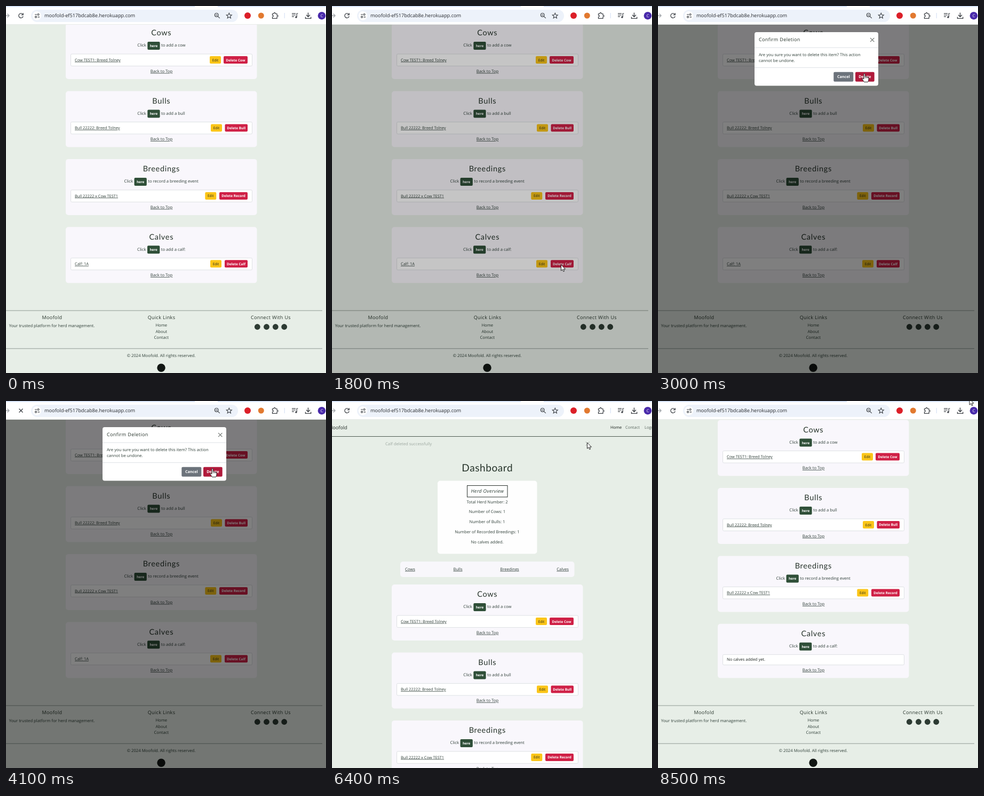
Animation, 600 px wide and 688 px high, one loop 8600 ms. Source, as an HTML page:

```html
<!DOCTYPE html>
<html lang="en">
<head>
<meta charset="utf-8">
<title>Herd dashboard</title>
<style>
html, body { margin: 0; width: 100%; height: 100%; overflow: hidden; background: #e7eee7; }
svg { display: block; width: 600px; height: 688px; }
text { font-family: "Open Sans", "Noto Sans", sans-serif; text-rendering: geometricPrecision; white-space: pre; }
.head { font-family: Lato, "Open Sans", sans-serif; }
.link { text-decoration: underline; }
</style>
</head>
<body>
<svg id="stage" viewBox="0 0 600 688" xmlns="http://www.w3.org/2000/svg"></svg>
<script>
const LOOP = 8600, STEP = 100;
const INK = '#2f3f38', DARK = '#26332a', GREEN = '#2f4f38', YELLOW = '#fbc518', RED = '#cf2046';
const stage = document.getElementById('stage');

function add(parent, tag, attrs) {
  const el = document.createElementNS(stage.namespaceURI, tag);
  for (const key in attrs) el.setAttribute(key, attrs[key]);
  parent.appendChild(el);
  return el;
}
const group = parent => add(parent, 'g', {});
const rect = (p, x, y, width, height, fill, rx = 0, more = {}) =>
  add(p, 'rect', { x, y, width, height, fill, rx, ...more });
const dot = (p, cx, cy, r, fill) => add(p, 'circle', { cx, cy, r, fill });
const stroke = (p, d, color, width = 1.3, more = {}) =>
  add(p, 'path', { d, fill: 'none', stroke: color, 'stroke-width': width, ...more });

// Text placed by the vertical middle of its capitals.
function text(p, x, cy, str, { size = 7.7, anchor = 'start', fill = INK, ...more } = {}) {
  const el = add(p, 'text', { x, y: cy + size * 0.36, 'font-size': size, 'text-anchor': anchor, fill, ...more });
  el.textContent = str;
  return el;
}
const mid = (p, x, cy, str, more = {}) => text(p, x, cy, str, { anchor: 'middle', ...more });
const title = (p, cy, str, size, spacing) =>
  mid(p, 291.3, cy, str, { size, class: 'head', fill: DARK, 'letter-spacing': spacing });
const label = (p, x, cy, str, more = {}) =>
  text(p, x, cy, str, { size: 9, fill: DARK, 'letter-spacing': 0.37, ...more });
const cross = (p, x, y, r, color, width = 1) =>
  stroke(p, `M${x - r} ${y - r}L${x + r} ${y + r}M${x + r} ${y - r}L${x - r} ${y + r}`, color, width);

function button(p, x, y, w, h, fill, str, color = '#fff', size = 6.4) {
  const g = group(p);
  const box = rect(g, x, y, w, h, fill, 2);
  mid(g, x + w / 2, y + h / 2 + 0.2, str, { size, fill: color, 'font-weight': color === '#fff' ? 700 : 400 });
  return box;
}

// Page
rect(stage, 0, 0, 600, 688, '#e7eee7');
const page = group(stage);

text(page, 28.5, 49.5, 'Moofold', { size: 9, anchor: 'end', fill: '#1c2620' });
text(page, 522, 49.5, 'Home', { size: 7.5, fill: '#18201b' });
text(page, 550, 49.5, 'Contact', { size: 7.5, fill: '#5d6a62' });
text(page, 586, 49.5, 'Logout', { size: 7.5, fill: '#5d6a62' });
rect(page, 0, 66, 600, 1, '#4d5a52');

const notice = group(page);
text(notice, 100, 80, 'Calf deleted successfully');
cross(notice, 479.3, 80, 3.6, '#6b736e', 1.2);

const main = group(page);
title(main, 125.5, 'Dashboard', 19, 0.6);
rect(main, 198, 149.5, 186.5, 137, '#fefefe', 5);
rect(main, 253.5, 158.5, 75.5, 21.5, 'none', 0, { stroke: '#2b332e' });
mid(main, 291.3, 169, 'Herd Overview', { size: 9, 'font-style': 'italic', 'letter-spacing': 0.35 });
['Total Herd Number: 2', 'Number of Cows: 1', 'Number of Bulls: 1',
 'Number of Recorded Breedings: 1', 'No calves added.']
  .forEach((str, i) => mid(main, 291, 189 + i * 18.7, str));

rect(main, 128, 301, 326.5, 29, '#f8f7fb', 5);
[['Cows', 137], ['Bulls', 227.5], ['Breedings', 315.3], ['Calves', 421.3]]
  .forEach(([str, x]) => text(main, x, 315, str, { class: 'link', size: 7.6 }));

const cardTop = i => 344 + i * 127.45;

function cardHead(g, y, name, action, x) {
  title(g, y + 18, name, 14.5, 0.7);
  text(g, x - 2.5, y + 41.6, 'Click', { anchor: 'end' });
  button(g, x, y + 35, 23.3, 15, GREEN, 'here');
  text(g, x + 25.7, y + 41.6, action);
}
const backLink = (g, y) => mid(g, 291.5, y, 'Back to Top', { class: 'link' });

function card(i, name, action, hereX, item, editX, kind, delX) {
  const y = cardTop(i), g = group(main);
  rect(g, 112, y, 358.5, 105, '#f9f7fc', 5);
  cardHead(g, y, name, action, hereX);
  rect(g, 121.5, y + 58, 340, 22.5, '#fff', 2, { stroke: '#dee1e4' });
  text(g, 129, y + 69, item, { class: 'link', size: 7.4 });
  button(g, editX, y + 62, 21, 14, YELLOW, 'Edit', '#23281f', 6.6);
  button(g, delX, y + 62, 453 - delX, 14, RED, 'Delete ' + kind);
  backLink(g, y + 90);
  return g;
}
card(0, 'Cows', 'to add a cow', 265.3, 'Cow TEST1: Breed Tolney', 382, 'Cow', 408);
card(1, 'Bulls', 'to add a bull', 265.3, 'Bull 22222: Breed Tolney', 384, 'Bull', 410.5);
card(2, 'Breedings', 'to record a breeding event', 240.5, 'Bull 22222 x Cow TEST1', 373.3, 'Record', 400);
const fullCalves = card(3, 'Calves', 'to add a calf:', 265, 'Calf: 1A', 383, 'Calf', 410);

const noCalves = group(main);
{
  const y = cardTop(3);
  rect(noCalves, 112, y, 358.5, 101.5, '#f9f7fc', 5);
  cardHead(noCalves, y, 'Calves', 'to add a calf:', 265);
  rect(noCalves, 121.5, y + 57.5, 340, 19.5, '#fff', 2, { stroke: '#dee1e4' });
  text(noCalves, 129, y + 66.7, 'No calves added yet.', { size: 7.5, fill: '#1d2420' });
  backLink(noCalves, y + 86.2);
}

// Footer, drawn where it stands when the page is scrolled to its end
const footer = group(page);
rect(footer, 0, 570.5, 593, 1, '#909b94');
label(footer, 86.5, 584, 'Moofold', { anchor: 'middle' });
mid(footer, 86, 599, 'Your trusted platform for herd management.');
label(footer, 291.5, 584, 'Quick Links', { anchor: 'middle' });
['Home', 'About', 'Contact'].forEach((str, i) => mid(footer, 291.3, 598.7 + i * 11.2, str));
label(footer, 496.5, 584, 'Connect With Us', { anchor: 'middle' });
[471.3, 488.5, 505.3, 521.7].forEach(x => dot(footer, x, 601.5, 5.4, '#2d3b33'));
rect(footer, 0, 641.7, 593, 1, '#909b94');
mid(footer, 291, 655.5, '© 2024 Moofold. All rights reserved.');
dot(footer, 291, 678.3, 7.7, '#121714');

// Dialog
const shade = rect(stage, 0, 35, 600, 653, '#000');
const dialog = group(stage);
rect(dialog, 181, 49, 232, 100.5, '#fff', 4);
label(dialog, 189, 63, 'Confirm Deletion');
cross(dialog, 401.7, 63.5, 3.7, '#6f7471', 1.2);
rect(dialog, 181, 77.5, 232, 1, '#dee2e6');
text(dialog, 189, 91.3, 'Are you sure you want to delete this item? This action');
text(dialog, 189, 102.3, 'cannot be undone.');
rect(dialog, 181, 115, 232, 1, '#dee2e6');
button(dialog, 329.3, 123.7, 37, 18, '#6c737b', 'Cancel', '#fff', 7.2);
const confirm = button(dialog, 370, 123.7, 35.7, 18, RED, 'Delete', '#fff', 7.2);

// Browser bar
const bar = group(stage), ICON = '#3d4146';
rect(bar, 0, 0, 600, 35, '#fff');
rect(bar, 0, 0, 354, 1.7, '#d3e1f8');
rect(bar, 397, 0, 203, 1.7, '#d3e1f8');
rect(bar, 0, 34.2, 600, 0.8, '#e3e6e4');
stroke(bar, 'M-2 18H6M2.5 14.5L6 18L2.5 21.5', '#a4a8ac');
const reload = group(bar);
stroke(reload, 'M31.4 15.6A4.2 4.2 0 1 0 32.1 19.3', ICON);
stroke(reload, 'M32.2 13.3V16.7H28.8', ICON);
const stop = cross(bar, 28, 18, 3.5, ICON, 1.4);
rect(bar, 47, 7, 388, 23, '#edf2fa', 11.5);
dot(bar, 58, 18.3, 8.3, '#fff');
stroke(bar, 'M54 16H58M59.5 20.6H63', ICON, 1.1);
[[60.6, 16], [56, 20.6]].forEach(([cx, cy]) =>
  add(bar, 'circle', { cx, cy, r: 1.5, fill: 'none', stroke: ICON, 'stroke-width': 1.1 }));
text(bar, 72, 18, 'moofold-ef517bdcab8e.herokuapp.com', { size: 9.2, fill: '#25282c' });
add(bar, 'circle', { cx: 394.7, cy: 16.8, r: 3.3, fill: 'none', stroke: ICON, 'stroke-width': 1.2 });
stroke(bar, 'M397.2 19.3L400.8 22.9M393.2 16.8H396.2', ICON, 1.2);
const star = Array.from({ length: 10 }, (_, i) => {
  const a = i * Math.PI / 5, r = i % 2 ? 2.3 : 5.3;
  return (418.3 + r * Math.sin(a)).toFixed(1) + ' ' + (18.5 - r * Math.cos(a)).toFixed(1);
});
stroke(bar, 'M' + star.join('L') + 'Z', ICON, 1.1);
dot(bar, 453, 18, 6, '#dc1f28');
dot(bar, 478.3, 18, 5.5, '#e2792f');
stroke(bar, 'M499.5 14.5H502.2Q502 12.4 503.6 12.4T505 14.5H508V17.4Q510 17.2 510 18.7T508 20V23.4H499.5V20.3Q501.5 20.2 501.5 18.8T499.5 17.3Z', ICON, 1.2);
rect(bar, 521.7, 13, 1, 10, '#cfdcf2');
stroke(bar, 'M536 14.2H543M536 17H543M536 19.8H540M545.2 21V14H547.5', ICON, 1.2);
dot(bar, 543.9, 21, 1.7, ICON);
stroke(bar, 'M566.5 12.5V20M563 16.8L566.5 20.2L570 16.8M561.5 20.5V23.4H571.7V20.5', ICON, 1.4);
dot(bar, 592, 18.2, 7.3, '#4a2bab');
mid(bar, 592, 18.2, 'C', { size: 7.5, fill: '#fff' });

// Pointer
const pointer = group(stage);
const outline = { fill: '#fff', stroke: '#111', 'stroke-width': 0.9, 'stroke-linejoin': 'round' };
const arrow = add(pointer, 'path', { d: 'M0 0V11.2L2.6 8.8L4.4 12.8L6.2 12L4.5 8.2H8Z', ...outline });
const hand = group(pointer);
add(hand, 'path', {
  d: 'M-1.2 1Q0 -.8 1.2 1V6Q2.6 5 3.5 6.4Q5 5.5 5.8 7Q8 6.4 8 9V11.5Q8 14 6.5 16H-.5L-4.2 10.5Q-4 8.3 -1.2 10.4Z',
  ...outline
});
stroke(hand, 'M1.2 6V9M3.5 6.5V9M5.8 7V9.2', '#111', 0.7);

// Timing
const T = { shade: 1700, dialog: 1800, hover: 2900, send: 3100, load: 4500, close: 6300, gone: 6500 };
const path = [
  [600, 604, 560], [1400, 429.5, 485], [2300, 429.5, 485], [2900, 387, 126.5], [5300, 387, 126.5],
  [6000, 478.5, 78], [6400, 478.5, 78], [6900, 487.5, 246], [7700, 487.5, 246], [8500, 584, -4]
];
const scrolls = [[6900, 0], [7000, 10], [7300, 150], [7600, 274.5]];
const handTimes = [[1400, 1700], [2800, 5300], [5900, 6400]];

const clamp = v => Math.max(0, Math.min(1, v));
const smooth = v => v * v * (3 - 2 * v);
const linear = v => v;

function follow(keys, t, ease, col = 1) {
  if (t <= keys[0][0]) return keys[0][col];
  for (let i = 1; i < keys.length; i++) {
    const a = keys[i - 1], b = keys[i];
    if (t <= b[0]) return a[col] + (b[col] - a[col]) * ease((t - a[0]) / (b[0] - a[0]));
  }
  return keys[keys.length - 1][col];
}
const show = (el, on) => el.setAttribute('visibility', on ? 'visible' : 'hidden');
const move = (el, x, y) => el.setAttribute('transform', `translate(${x} ${y})`);

function draw(t) {
  const fresh = t >= T.load;
  const noted = fresh && t < T.gone;
  show(notice, noted);
  notice.setAttribute('opacity', t >= T.close ? 0.4 : 1);
  move(main, 0, noted ? 0 : -34);
  move(footer, 0, noted ? 308.5 : fresh ? 274.5 : 278);
  move(page, 0, -(fresh ? follow(scrolls, t, linear) : 278));
  show(fullCalves, !fresh);
  show(noCalves, fresh);

  shade.setAttribute('opacity', fresh ? 0 : clamp((t - T.shade) / 220) * 0.5);
  const rise = clamp((t - T.dialog) / 300);
  show(dialog, rise > 0 && !fresh);
  dialog.setAttribute('opacity', clamp(rise * 1.6));
  move(dialog, 0, -50 * (1 - rise) ** 2);
  confirm.setAttribute('fill', t >= T.hover ? '#b01a3b' : RED);

  const busy = t >= T.send && !fresh;
  show(reload, !busy);
  show(stop, busy);

  const pointing = handTimes.some(([a, b]) => t >= a && t < b);
  const seen = t >= path[0][0];
  show(arrow, seen && !pointing);
  show(hand, seen && pointing);
  move(pointer, follow(path, t, smooth, 1), follow(path, t, smooth, 2));
}

const start = performance.now();
function tick() {
  const t = (performance.now() - start) % LOOP;
  draw(Math.floor(t / STEP) * STEP);
  requestAnimationFrame(tick);
}
tick();
</script>
</body>
</html>
```
